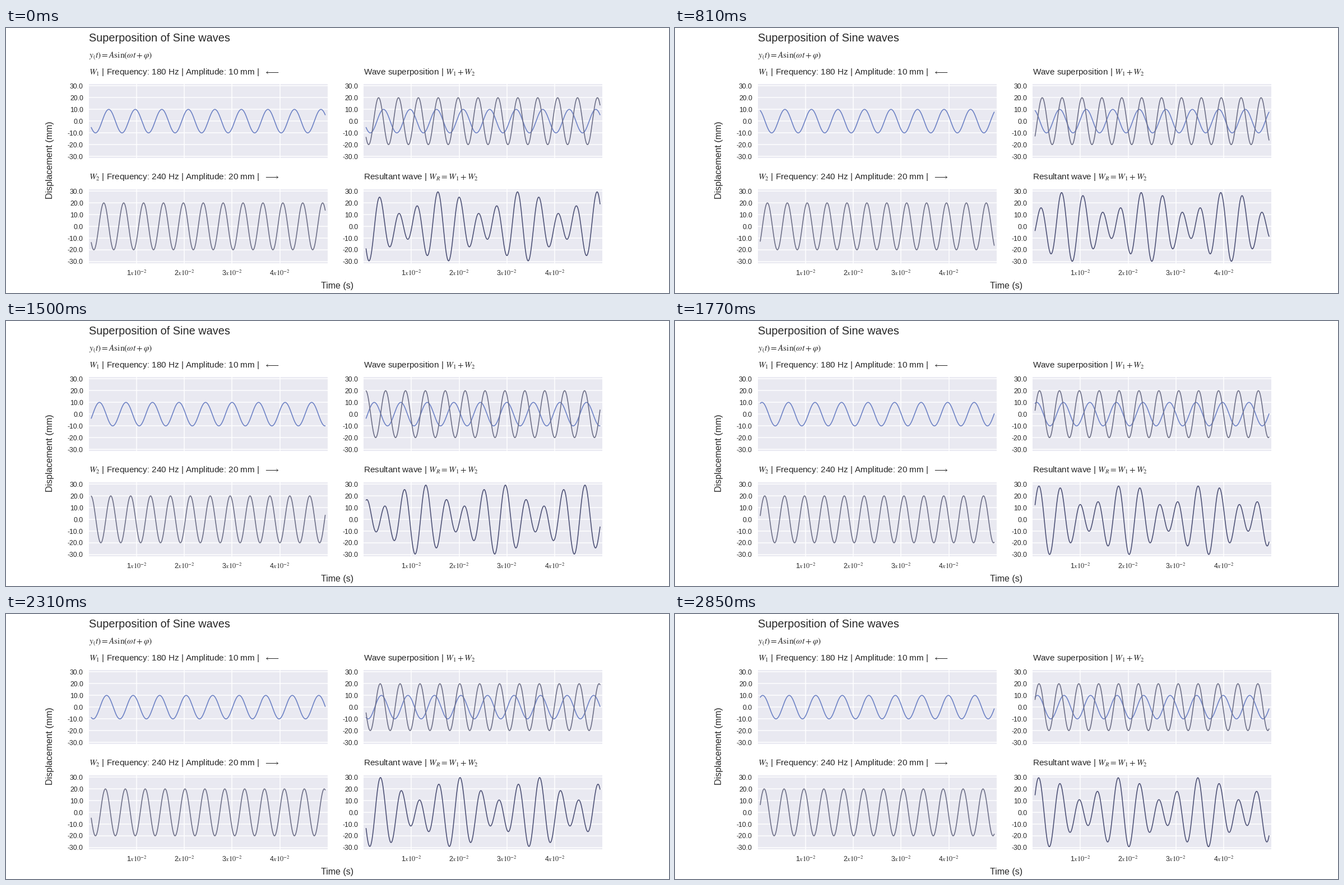
Write a matplotlib script that moves like this. It is 1183x473 px and loops after 3 s.

```python
import numpy as np
import matplotlib.pyplot as plt
from matplotlib.animation import FuncAnimation

W, H, DPI = 1183, 473, 100
PX = 72 / DPI  # points per pixel
INK = "#262626"
BLUE, GREY, NAVY = "#6b80c4", "#6b6d86", "#4c5075"
TITLE, HEADING, AXIS, TICK = 19.86, 15.28, 16, 12.22  # text sizes in pixels
FRAMES, LAST = 100, 95  # the final pose is held to the end of the loop

plt.rcParams.update({
    "font.family": "Liberation Sans",
    "mathtext.fontset": "stix",
    "axes.unicode_minus": False,
    "text.color": INK,
})

fig = plt.figure(figsize=(W / DPI, H / DPI), dpi=DPI, facecolor="white")


def label(x, y, text, size, **kw):
    """Place text by its pixel position, y measured from the top."""
    fig.text(x / W, 1 - y / H, text, fontsize=size * PX, **kw)


def panel(left, top, show_time):
    width, height = 426, 132.5
    ax = fig.add_axes([left / W, 1 - (top + height) / H, width / W, height / H])
    ax.set(xlim=(0, 0.05), ylim=(-31.6, 31.6), facecolor="#e9e9f1")
    ax.set_xticks(np.arange(1, 5) / 100)
    ax.set_yticks(np.arange(-30, 31, 10))
    ax.set_yticklabels([f"{v:.1f}" for v in range(-30, 31, 10)])
    ax.set_xticklabels([f"{n}$x10^{{-2}}$" if show_time else "" for n in range(1, 5)])
    ax.tick_params(length=0, pad=10 * PX, labelsize=TICK * PX, labelcolor=INK)
    ax.grid(color="white", linewidth=1.53 * PX)
    ax.set_axisbelow(True)
    for spine in ax.spines.values():
        spine.set_visible(False)
    return ax


def wave_line(ax, color):
    return ax.plot([], [], color=color, linewidth=1.6 * PX, solid_capstyle="round")[0]


LEFT, RIGHT, TOP, BOTTOM = 147.85, 638.2, 100, 287.8
ax1 = panel(LEFT, TOP, False)
ax2 = panel(LEFT, BOTTOM, True)
ax_both = panel(RIGHT, TOP, False)
ax_sum = panel(RIGHT, BOTTOM, True)

label(LEFT, 23.5, "Superposition of Sine waves", TITLE)
label(LEFT, 53, r"$y_(t) = A\sin(\omega t + \varphi)$", HEADING)
label(LEFT, 82.5, r"$W_1$ | Frequency: 180 Hz | Amplitude: 10 mm |  $\longleftarrow$", HEADING)
label(LEFT, 269.8, r"$W_2$ | Frequency: 240 Hz | Amplitude: 20 mm |  $\longrightarrow$", HEADING)
label(RIGHT, 82.5, "Wave superposition | $W_1 + W_2$", HEADING)
label(RIGHT, 269.8, "Resultant wave | $W_R = W_1 + W_2$", HEADING)
label(591.5, 465, "Time (s)", AXIS, ha="center")
label(78.3, 235.8, "Displacement (mm)", AXIS, rotation=90, ha="center", va="center")

t = np.linspace(0.0005, 0.0495, 500)
line1, line2 = wave_line(ax1, BLUE), wave_line(ax2, GREY)
both1, both2 = wave_line(ax_both, BLUE), wave_line(ax_both, GREY)
line_sum = wave_line(ax_sum, NAVY)
lines = [line1, line2, both1, both2, line_sum]


def update(i):
    phase = -np.pi + 2 * np.pi * min(i, LAST) / 37
    w1 = 10 * np.sin(2 * np.pi * 180 * t + phase)
    w2 = 20 * np.sin(2 * np.pi * 240 * t - phase)
    for line, y in zip(lines, (w1, w2, w1, w2, w1 + w2)):
        line.set_data(t, y)
    return lines


anim = FuncAnimation(fig, update, frames=FRAMES, interval=30, repeat=True, blit=False)
plt.show()
```
